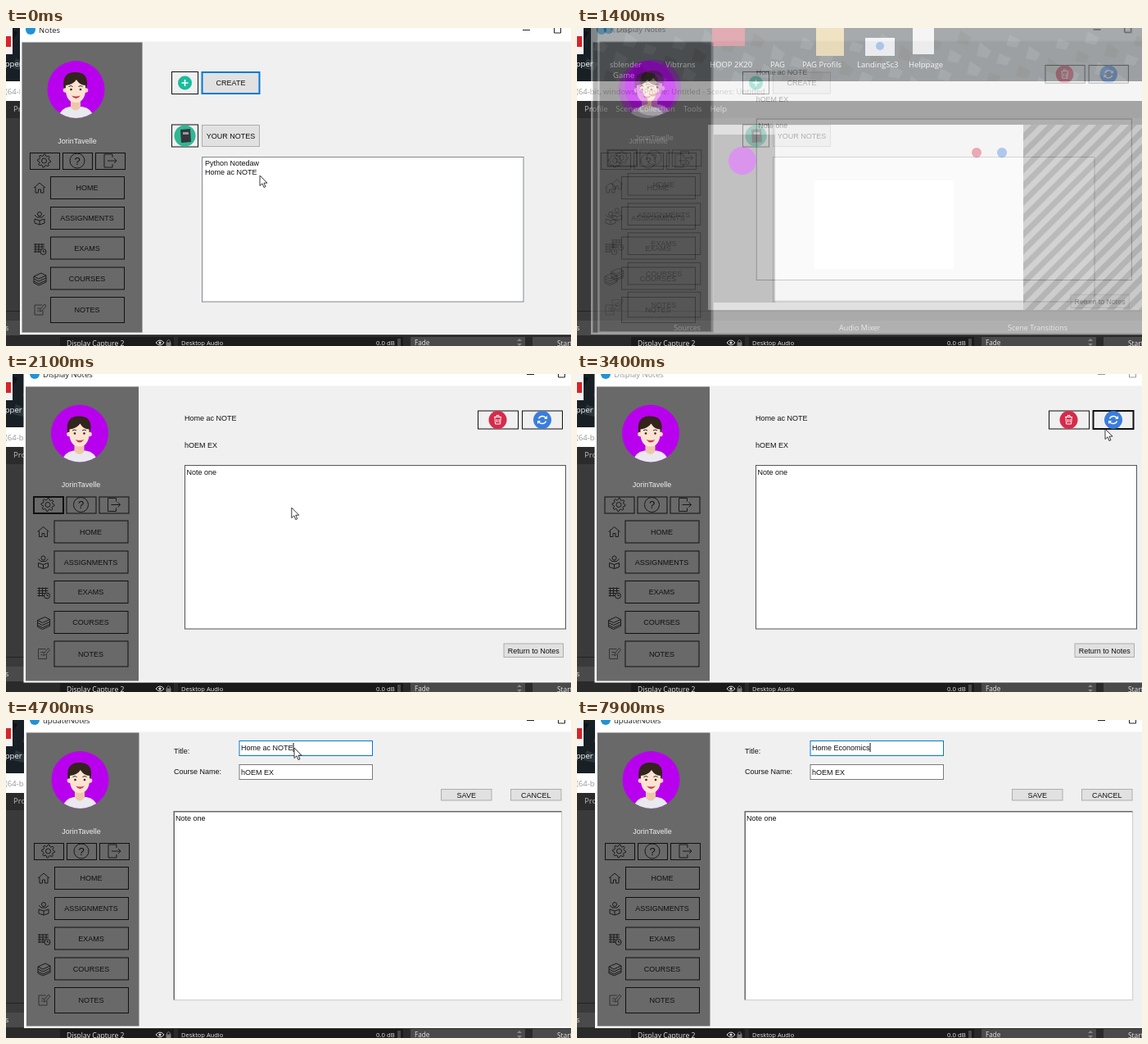
These frames come from a looping animation (690 px wide and 388 px high, 8 s). An HTML page:

```html
<!DOCTYPE html>
<html lang="en">
<head>
<meta charset="utf-8">
<title>Notes app</title>
<style>
  html, body { margin: 0; width: 100%; height: 100%; overflow: hidden; background: #3b3a3b; }
  svg { display: block; width: 100vw; height: 100vh; }
  text { font: 9px "Liberation Sans", sans-serif; fill: #111; white-space: pre; }
  .ui { font-family: "Open Sans", sans-serif; }
  .line { fill: none; stroke: #1a1a1a; stroke-width: 1; }
</style>
</head>
<body>
<svg id="stage" viewBox="0 0 690 388"></svg>
<script>
const DURATION = 8000, STEP = 100;
const BLUE = '#0078d7', PANEL = '#f0f0f0', SIDE = '#696969';

// ---- markup helpers ----
const fill = (x, y, w, h, color, extra = '') =>
  `<rect x="${x}" y="${y}" width="${w}" height="${h}" fill="${color}" ${extra}/>`;
const box = (x, y, w, h, color, stroke, width = 1, extra = '') =>
  fill(x + .5, y + .5, w - 1, h - 1, color, `stroke="${stroke}" stroke-width="${width}" ${extra}`);
const text = (x, y, s, extra = '') => `<text x="${x}" y="${y}" ${extra}>${s}</text>`;
const ui = (x, y, s, size, color, extra = '') =>
  text(x, y, s, `class="ui" style="font-size:${size}px;fill:${color}" ${extra}`);
const circle = (x, y, r, color, extra = '') => `<circle cx="${x}" cy="${y}" r="${r}" fill="${color}" ${extra}/>`;
const line = (d, extra = '') => `<path class="line" d="${d}" ${extra}/>`;
const path = (d, color) => `<path d="${d}" fill="${color}"/>`;
const group = (s, extra) => `<g ${extra}>${s}</g>`;
const at = (x, y, s) => group(s, `transform="translate(${x} ${y})"`);
const button = (x, y, w, h, label, id = '') =>
  box(x, y, w, h, '#e1e1e1', '#adadad', 1, id && `id="${id}"`) +
  text(x + w / 2, y + h / 2 + 3.3, label, 'text-anchor="middle"');

// ---- desktop and recorder behind the windows ----
function desktop() {
  const labels = [[40, 'sblender'], [108, 'Vibtrans'], [162, 'HOOP 2K20'], [236, 'PAG'],
    [275, 'PAG Profils'], [342, 'LandingSc3'], [405, 'Helppage']];
  const rocks = Array.from({ length: 60 }, (_, i) => {
    const x = i * 12, y = (i * 37) % 60;
    return path(`M${x} ${y}l14 ${5 + i % 7}l-5 9l-13 -3z`, i % 3 ? '#2c363c' : '#0c1114');
  }).join('');
  return fill(0, 0, 690, 388, '#3b3a3b') +
    fill(0, 0, 690, 65, '#182026') + rocks +
    fill(165, 0, 40, 22, '#b3273a') + fill(292, 0, 34, 34, '#d9b866') + fill(352, 12, 36, 22, '#dfe6ee') +
    circle(370, 22, 5, '#3b7ddd') + fill(410, 0, 26, 32, '#e8e8e8') +
    labels.map(([x, s]) => ui(x, 48, s, 9.5, '#fff')).join('') + ui(44, 61, 'Game', 9.5, '#fff') +
    fill(0, 0, 8, 32, '#f4f4f4') + fill(0, 10, 6, 13, '#d8232a') + ui(-7, 47, 'opper', 9.5, '#fff') +
    fill(0, 65, 690, 24, '#fff') + ui(-1, 81, '(64-bit, windows) - Profile: Untitled - Scenes: Untitled', 9.5, '#999') +
    fill(0, 89, 690, 21, '#2b2b2b') + ui(9, 102, 'Profile    Scene Collection    Tools    Help', 9.5, '#bbb') +
    fill(160, 118, 385, 226, '#c9c9c9') + fill(167, 130, 75, 205, '#777') + circle(202, 162, 17, '#b800ee') +
    fill(242, 118, 303, 214, '#f3f3f3') + fill(290, 186, 170, 108, '#fff') +
    circle(488, 152, 6, '#d72b4b') + circle(519, 152, 6, '#3b7ddd') +
    fill(545, 118, 145, 226, 'url(#stripes)') +
    fill(0, 345, 690, 1, '#222') + fill(0, 357, 690, 18, '#4a4a4a') +
    ui(-1, 369, 's', 9, '#ddd') + ui(118, 369, 'Sources', 9, '#ddd') +
    ui(320, 369, 'Audio Mixer', 9, '#ddd') + ui(526, 369, 'Scene Transitions', 9, '#ddd') +
    fill(0, 375, 690, 13, '#2b2a2b') + fill(66, 377, 139, 11, '#1b1b1b') + fill(210, 377, 275, 11, '#1b1b1b') +
    ui(74, 387.5, 'Display Capture 2', 8.6, '#e4e4e4') +
    line('M183 384q5 -6 10 0q-5 6 -10 0z', 'style="stroke:#ddd"') + circle(188, 384, 1.6, '#ddd') +
    fill(195.5, 383.5, 6, 5, '#777') + line('M196.5 384v-2q2 -3 4 0v2', 'style="stroke:#777"') +
    ui(214, 387, 'Desktop Audio', 7.5, '#e4e4e4') + ui(452, 387, '0.0 dB', 7.8, '#e4e4e4') +
    fill(478, 379, 4, 9, '#4a4a4a') +
    fill(494, 377, 140, 11, '#4a4a4a') + ui(499, 387, 'Fade', 8.2, '#e4e4e4') +
    path('M624 382l3 -3l3 3zM624 385l3 3l3 -3z', '#888') +
    fill(643, 377, 47, 11, '#4a4a4a') + ui(673, 387.5, 'Start', 8.4, '#e4e4e4');
}

// ---- sidebar shared by all windows ----
function avatar() {
  return circle(85.5, 75, 35, '#b800ee') + group(
    path('M63 112q2 -14 15 -16h15q13 2 15 16z', '#e9e9ef') +
    path('M79 84h12v13q-6 7 -12 0z', '#eec7ab') +
    path('M71 76q-4 -21 12 -22q17 -1 16 15l-2 9z', '#33241c') +
    circle(72.5, 76, 2.8, '#f6d7c1') + circle(97.5, 76, 2.8, '#f6d7c1') +
    path('M73 70q9 -1 13 -7q4 7 11 7v8q-2 13 -12 13t-12 -13z', '#fce3d2') +
    circle(79.5, 75, 1.3, '#33241c') + circle(91, 75, 1.3, '#33241c') +
    line('M76.5 71.5q3 -2 5 0M88.500 71.5q3 -2 5 0', 'style="stroke:#33241c"') +
    path('M80 82.500q5.500 2 11 0q-5.500 7 -11 0z', '#c43b4b'), 'clip-path="url(#round)"');
}

function menuIcons() {
  const gear = Array.from({ length: 32 }, (_, i) => {
    const r = i % 4 < 2 ? 8 : 6, a = i * Math.PI / 16;
    return `${(r * Math.cos(a)).toFixed(1)} ${(r * Math.sin(a)).toFixed(1)}`;
  }).join('L');
  return at(46.5, 162, line(`M${gear}z`) + circle(0, 0, 3, 'none', 'class="line"')) +
    circle(87, 162, 9, 'none', 'class="line"') +
    text(87, 166.5, '?', 'text-anchor="middle" style="font-size:13px"') +
    line('M130 158v-4h-10v16h10v-4M124 162h11M132 159l3 3l-3 3') +
    at(41, 195, line('M-7 0L0 -6L7 0M-5 -1v7h3.500v-4h3v4h3.500v-7')) +
    at(41, 232, circle(0, -5, 2.5, 'none', 'class="line"') +
      line('M-3 -1L-6 -4M3 -1L6 -4M-6 1L0 3L6 1V6L0 8L-6 6zM0 3v5M-3 -1h6')) +
    at(41, 269, line('M-7 -5H6M-7 -2H6M-7 1H2M-7 4H1M-5 -6V5M-1 -6V5M3 -6V0') +
      circle(4.5, 4, 3.5, SIDE, 'class="line" style="fill:#696969"') + line('M4.500 2v2h2')) +
    at(41, 306, line('M-7 -3L2 -7L8 -4L-1 0zM-7 -3v3l6 3l9 -4v-3M-7 0v3l6 3l9 -4v-3M-7 3v2l6 3l9 -4v-2')) +
    at(41, 344, line('M3 -6H-6V6H4V1M-3 -2h4M-3 1h2M0 2l1 -3l5 -6l2 2l-5 6z', 'style="stroke:#333"'));
}

function sidebar(dx, dy, x, y, w, h, id) {
  const entries = [['HOME', 181, 28], ['ASSIGNMENTS', 218, 28], ['EXAMS', 254.5, 28],
    ['COURSES', 291.5, 28], ['NOTES', 328, 32]];
  return fill(x, y, w, h, SIDE) + at(dx, dy,
    avatar() + text(87, 140.5, 'JorinTavelle', 'text-anchor="middle" style="fill:#eee"') +
    [29, 69, 109].map((bx, i) => box(bx, 152, 37, 21, SIDE, '#111', 1, i ? '' : `id="${id}Gear"`)).join('') +
    entries.map(([label, by, bh]) => box(54, by, 91, bh, SIDE, '#111') +
      text(99, by + bh / 2 + 3.3, label, 'text-anchor="middle"')).join('') + menuIcons());
}

function frame(id, title, left, top, bottom, dx, dy, content) {
  const caption = `class="${id}Caption"`;
  return group(
    fill(left, -20, 720, bottom + 20, '#fff') + fill(left + 2, top, 720, bottom - top - 2, PANEL) +
    circle(30 + dx, 2 + dy, 6, '#1f93d6') +
    group(ui(40 + dx, 6 + dy, title, 9.5, 'currentColor') +
      `<path d="M${631 + dx} ${2.5 + dy}h9M${669.5 + dx} -4v${10 + dy}h8v-12" fill="none" stroke="currentColor"/>`,
      `id="${id}Caption" color="#222"`) + content, `id="${id}"`);
}

// ---- the three windows ----
function notesWindow() {
  return frame('notes', 'Notes', 17, 16.5, 374, 0, 0,
    sidebar(0, 0, 19.5, 17.5, 147, 354, 'notes') +
    box(202, 53, 33, 28, PANEL, '#111') + circle(218.5, 67, 8.5, '#1abc9c') +
    line('M214.5 67h8M218.500 63v8', 'style="stroke:#fff;stroke-width:1.6"') +
    button(239, 53.5, 71, 27, 'CREATE', 'create') +
    box(202, 117.500, 33, 28, PANEL, '#111') + circle(218.5, 131.5, 13, '#2fb893') +
    path('M213 124l12 -1l1 16l-12 1z', '#33373c') + fill(216, 127, 7, 3, '#999') +
    button(239, 118, 71, 27, 'YOUR NOTES') +
    box(239, 157, 393.5, 177.5, '#fff', '#828790') +
    group(fill(241, 170.5, 390, 11, BLUE, 'id="rowMark"') + text(243, 168, 'Python Notedaw') +
      text(243, 179, 'Home ac NOTE', 'id="row"'), 'id="list"'));
}

function displayWindow() {
  const trash = line('M596 52.500h9M599 52v-1.500h3v1.500M597 53l.6 8h6l.6 -8M599.500 55v4M602 55v4', 'style="stroke:#fff"');
  const refresh = line('M650.500 54.500a5 5 0 0 1 9 -.5M659.500 57.500a5 5 0 0 1 -9 .5', 'style="stroke:#fff;stroke-width:1.5"') +
    path('M661 51v4h-4zM649 61v-4h4z', '#fff');
  return frame('display', 'Display Notes', 21.5, 14.5, 376.5, 5, -2,
    sidebar(4.5, -2.5, 24, 15.5, 138, 359, 'display') +
    text(218, 57, 'Home ac NOTE') + text(218, 90, 'hOEM EX') +
    box(576, 44.5, 50, 23, PANEL, '#111') + circle(600.5, 56, 11, '#d72b4b') + trash +
    box(630, 44.5, 50, 23, PANEL, '#111', 1, 'id="refresh"') + circle(655, 56, 11, '#3b7ddd') + refresh +
    box(218, 111, 466, 200.5, '#fff', '#555') + text(220.5, 122.5, 'Note one') +
    button(607.5, 328.5, 73.5, 17.5, 'Return to Notes'));
}

function updateWindow() {
  return frame('update', 'updateNotes', 22, 14.5, 376, 5, -2,
    sidebar(5, -2, 25, 15.5, 137.5, 358, 'update') +
    text(205, 41, 'Title:') + text(205, 65.5, 'Course Name:') +
    box(284.5, 25, 163.5, 19, '#fff', '#7a7a7a', 1, 'id="field"') +
    fill(0, 28, 0, 11.5, BLUE, 'id="selection"') + text(287, 37, '', 'id="typed"') +
    fill(0, 28, 1, 11, '#111', 'id="caret"') +
    box(284.5, 54, 163.5, 19, '#fff', '#7a7a7a') + text(287, 66.5, 'hOEM EX') +
    button(531, 84, 62.5, 14.5, 'SAVE') + button(616, 84, 62.5, 14.5, 'CANCEL') +
    fill(204.5, 111, 475, 231.5, '#e3e3e3') + fill(204.5, 111, 474, 230.5, SIDE) +
    fill(206, 112.500, 472.500, 229, '#fff') + text(207, 122.5, 'Note one'));
}

document.getElementById('stage').innerHTML =
  `<defs><clipPath id="round"><circle cx="85.5" cy="75" r="35"/></clipPath>
   <pattern id="stripes" width="14" height="14" patternUnits="userSpaceOnUse" patternTransform="rotate(45)">
   <rect width="14" height="14" fill="#8b8b8b"/><rect width="7" height="14" fill="#4a4a4a"/></pattern></defs>` +
  desktop() + notesWindow() + displayWindow() + updateWindow() +
  '<path id="cursor" d="M0 0v12.500l3 -2.700l2 4.700l2 -.9l-2 -4.500h4z" fill="#fff" stroke="#222" stroke-width=".9"/>';

// ---- animation ----
const el = Object.fromEntries([...document.querySelectorAll('[id]')].map(e => [e.id, e]));
const set = (id, attrs) => { for (const k in attrs) el[id].setAttribute(k, attrs[k]); };
const show = (id, on) => set(id, { visibility: on ? 'visible' : 'hidden' });

// Keys are [time, ...values], eased between neighbours.
function track(keys, t) {
  const i = keys.findIndex(k => k[0] > t);
  if (i < 0) return keys[keys.length - 1].slice(1);
  if (i === 0) return keys[0].slice(1);
  const [a, b] = [keys[i - 1], keys[i]];
  const p = (t - a[0]) / (b[0] - a[0]), e = p * p * (3 - 2 * p);
  return a.slice(1).map((v, j) => v + (b[j + 1] - v) * e);
}

const POINTER = [[0, 310, 180], [100, 308, 179], [200, 306, 177], [1900, 306, 177], [2800, 645, 67],
  [3700, 645, 67], [4600, 352, 34], [5000, 352, 34], [5400, 314, 34]];
const OPACITY = {
  notes: [[1300, 1], [1400, .45], [1500, 0]],
  display: [[1300, 0], [1400, .3], [1500, .82], [1600, 1], [3400, 1], [3500, .45], [3600, 0]],
  update: [[3400, 0], [3500, .5], [3600, .93], [3700, 1]]
};
const KEY_TIMES = [6100, 6400, 6600, 6800, 7000, 7300, 7500, 7700, 7900];

function titleAt(t) {
  if (t < 5900) return 'Home ac NOTE';
  return 'Home ' + 'Economics'.slice(0, KEY_TIMES.filter(k => k <= t).length);
}

function openScale(id, scale) {
  set(id, { transform: `translate(270 80) scale(${scale}) translate(-270 -80)` });
}

function draw(t) {
  for (const id in OPACITY) {
    const [opacity] = track(OPACITY[id], t);
    set(id, { opacity });
    show(id, opacity > 0);
  }
  openScale('display', track([[1400, .985], [1500, .993], [1600, 1]], t)[0]);
  openScale('update', track([[3500, .99], [3600, .997], [3700, 1]], t)[0]);

  const picked = t >= 400;
  set('notesCaption', { color: t < 1200 ? '#222' : '#999' });
  set('displayCaption', { color: t < 3300 ? '#222' : '#999' });
  set('create', { stroke: picked ? '#adadad' : BLUE, 'stroke-width': picked ? 1 : 2 });
  el.list.style.display = t < 1200 ? '' : 'none';
  el.rowMark.style.display = picked ? '' : 'none';
  el.row.style.fill = picked ? '#fff' : '#111';

  set('displayGear', { 'stroke-width': t < 2900 ? 2 : 1 });
  set('refresh', { 'stroke-width': t < 2900 ? 1 : 2 });

  const focused = t >= 4700;
  set('updateGear', { 'stroke-width': focused ? 1 : 2 });
  set('field', { stroke: focused ? BLUE : '#7a7a7a' });
  el.typed.textContent = titleAt(t);
  const [px, py] = track(POINTER, t);
  const end = 287 + el.typed.getComputedTextLength();
  const selecting = t >= 5100 && t < 5900;
  const start = Math.max(px, 313.5);
  set('selection', { x: start, width: selecting ? Math.max(0, end - start) : 0, opacity: .55 });
  set('caret', { x: selecting ? start : end, opacity: focused ? 1 : 0 });

  set('cursor', { transform: `translate(${px} ${py})` });
  show('cursor', t < 1200 || (t >= 1600 && t < 3500) || (t >= 3700 && t < 5800));
}

const origin = performance.now();
function tick() {
  const t = (performance.now() - origin) % DURATION;
  draw(Math.floor(t / STEP) * STEP);
  requestAnimationFrame(tick);
}
tick();
</script>
</body>
</html>
```
